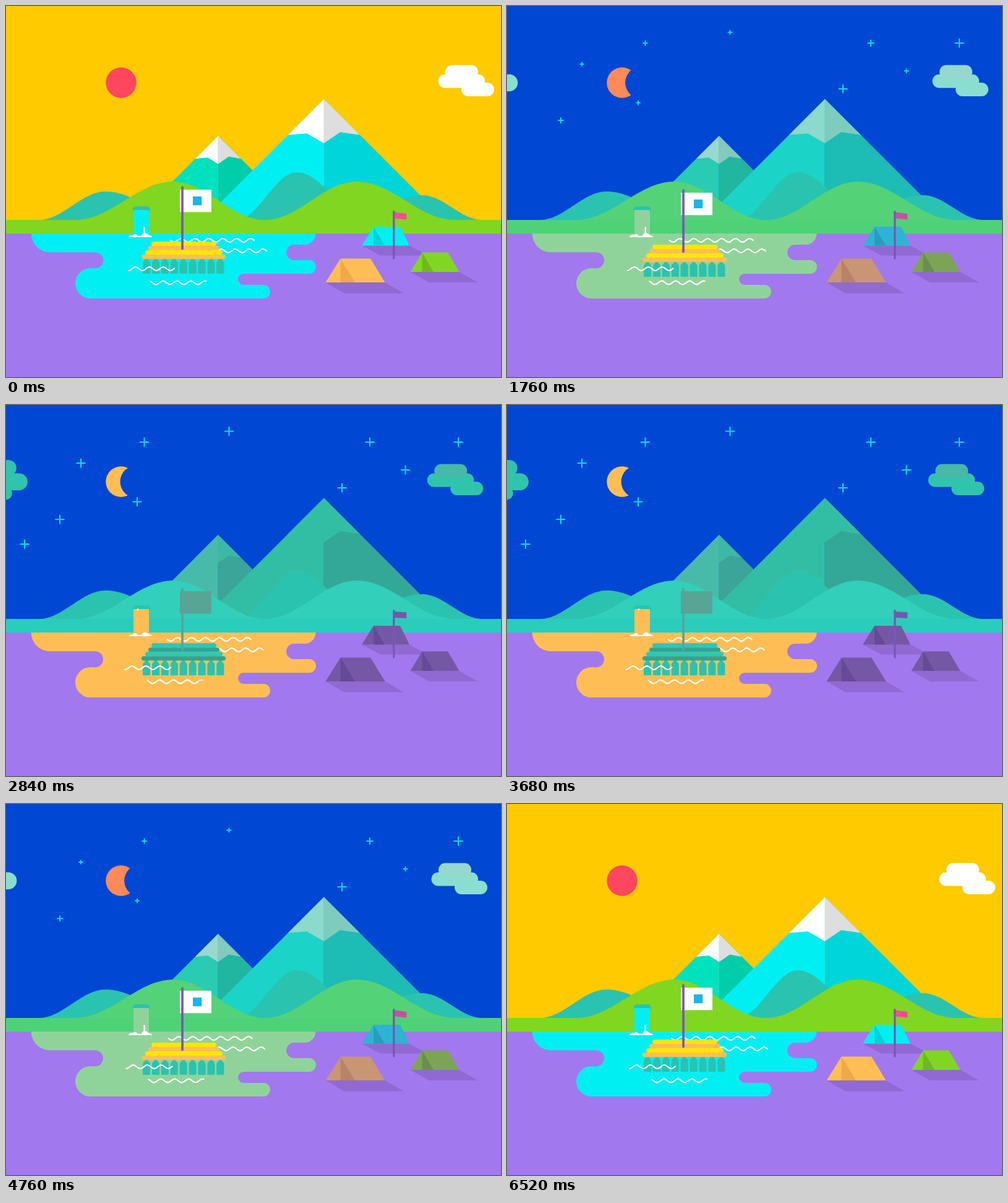
These frames come from a looping animation (800x600 px, 6560 ms). An HTML page with a canvas:

```html
<!DOCTYPE html>
<html lang="en">
<head>
<meta charset="utf-8">
<title>Lake camp, day and night</title>
<style>
html, body { margin: 0; width: 100%; height: 100%; overflow: hidden; }
canvas { display: block; width: 800px; height: 600px; }
</style>
</head>
<body>
<canvas id="stage" width="800" height="600"></canvas>
<script>
const ctx = document.getElementById('stage').getContext('2d');
const LOOP = 6560, STEP = 40, TEAL = '#2ac3af', GROUND = '#a278ee';

const clamp = v => Math.max(0, Math.min(1, v));
const ramp = (u, from, to) => clamp((u - from) / (to - from));
const lerp = (a, b, p) => a + (b - a) * p;

function mix(a, b, p) {
  const part = (hex, i) => parseInt(hex.slice(i, i + 2), 16);
  return `rgb(${[1, 3, 5].map(i => Math.round(lerp(part(a, i), part(b, i), p)))})`;
}

function poly(color, ...pts) {
  ctx.fillStyle = color;
  ctx.beginPath();
  for (let i = 0; i < pts.length; i += 2) ctx.lineTo(pts[i], pts[i + 1]);
  ctx.fill();
}

function rect(color, x, y, w, h) {
  ctx.fillStyle = color;
  ctx.fillRect(x, y, w, h);
}

function pill(color, x, y, w, h, r = h / 2) {
  ctx.fillStyle = color;
  ctx.beginPath();
  ctx.roundRect(x, y, w, h, r);
  ctx.fill();
}

function disc(color, x, y, r) {
  ctx.fillStyle = color;
  ctx.beginPath();
  ctx.arc(x, y, r, 0, Math.PI * 2);
  ctx.fill();
}

// Cosine hump standing on y = 346, with its own reach on each side
function hill(color, cx, top, left, right) {
  ctx.fillStyle = color;
  ctx.beginPath();
  for (let x = cx - left; x <= cx + right; x += 2) {
    const d = (x - cx) / (x < cx ? left : right);
    ctx.lineTo(x, top + (346 - top) * (1 - Math.cos(Math.PI * d)) / 2);
  }
  ctx.lineTo(cx + right, 347);
  ctx.lineTo(cx - left, 347);
  ctx.fill();
}

function drawSky(u, land) {
  const sky = mix('#ffca00', '#0047d3', ramp(u, 1360, 1760));
  rect(sky, 0, 0, 800, 368);
  disc(mix('#ff465f', '#ffbe55', land), 186, 124, 24.7);
  if (u > 1360) {
    const k = 1 - (1 - ramp(u, 1360, 2160)) ** 2;
    disc(sky, lerp(237, 210.5, k), 124, 26);
  }
  drawStars(u);
}

function drawStars(u) {
  const stars = [
    [731, 60, 1360], [543, 134, 1375], [588, 60, 1480], [645.5, 105, 1580], [360.5, 42.5, 1580],
    [223.5, 60, 1560], [212, 156.5, 1590], [87, 185, 1530], [121, 94, 1600], [30, 225, 1770]
  ];
  ctx.strokeStyle = '#00e1eb';
  ctx.lineWidth = 2;
  ctx.lineCap = 'round';
  for (const [x, y, start] of stars) {
    const r = 6.8 * ramp(u, start, start + 400);
    if (!r) continue;
    ctx.beginPath();
    ctx.moveTo(x - r, y);
    ctx.lineTo(x + r, y);
    ctx.moveTo(x, y - r);
    ctx.lineTo(x, y + r);
    ctx.stroke();
  }
}

function drawClouds(u, land) {
  const body = mix('#ffffff', '#30c4ac', land);
  const cap = mix('#ffffff', '#46b9a8', land);
  const x = -u / 160;
  pill(body, 698.5 + x, 110.5, 75.5, 22);
  pill(body, 736 + x, 124, 53, 22);
  pill(cap, 710 + x, 95.5, 53, 22);
  const edge = -11 + u / 62;
  pill(body, edge - 98, 89, 80, 26);
  pill(body, edge - 110, 110.5, 110, 27.5);
  pill(body, edge - 95, 132, 70, 21.5);
}

// Two shaded faces and a snow cap; dip points give the snow's lower rim
function mountain(x, y, snow, l, r, tip, colors) {
  const base = 346, h = base - y;
  poly(colors[0], x, y, x - h, base, x, base);
  poly(colors[1], x, y, x + h, base, x, base);
  poly(colors[2], x, y, x - snow, y + snow, l[0], l[1], x, tip);
  poly(colors[3], x, y, x + snow, y + snow, r[0], r[1], x, tip);
}

function drawLand(land) {
  mountain(342.8, 210, 37, [326, 245], [360, 243.5], 255.5, [
    mix('#00e1be', '#48baaa', land), mix('#00cdaa', '#3aa598', land),
    mix('#ffffff', '#48baaa', land), mix('#dedede', '#3cb9a5', land)
  ]);
  mountain(513.8, 150.5, 58, [486, 206], [540, 204], 222, [
    mix('#00eff3', '#32bea5', land), mix('#00d5d9', '#34a898', land),
    mix('#ffffff', '#32bea5', land), mix('#dedede', '#32bea5', land)
  ]);
  hill(TEAL, 470, 269, 98, 118);
  hill(TEAL, 161, 300, 108, 135);
  hill(TEAL, 672, 306, 125, 98);
  const green = mix('#80d621', '#32cfbb', land);
  hill(green, 270, 284, 158, 148);
  hill(green, 567, 284, 148, 158);
  rect(mix('#80d621', '#2acdbb', land), 0, 346, 800, 22.5);
  rect(GROUND, 0, 368, 800, 232);
}

function drawLake(color) {
  const Q = Math.PI / 2;
  ctx.fillStyle = color;
  ctx.beginPath();
  ctx.moveTo(500.5, 368);
  ctx.arc(482.5, 368, 18, 0, Q);
  ctx.arc(465.5, 398.5, 12.5, -Q, Q, true);
  ctx.arc(490, 422, 11, -Q, Q);
  ctx.arc(384, 442, 9, -Q, Q, true);
  ctx.arc(416, 462, 11, -Q, Q);
  ctx.arc(136.5, 448.5, 24.5, Q, 3 * Q);
  ctx.arc(144, 411.2, 13, Q, -Q, true);
  ctx.arc(71, 368, 30.3, Q, 2 * Q);
  ctx.fill();
}

function drawFall(u, water) {
  pill(TEAL, 205, 324, 27.5, 9, [5, 5, 2, 2]);
  rect(water, 206, 330, 25, 39);
  ctx.save();
  ctx.beginPath();
  ctx.rect(200, 329.5, 36, 43);
  ctx.clip();
  for (const [x, start] of [[213, 176], [223.7, 536]]) {
    const head = 329 + ((u - start) % 880 + 880) % 880 / 8;
    pill('#ffffff', x - 1.2, head - 15, 2.4, 15);
  }
  ctx.restore();

  const swell = Math.cos(u / 880 * Math.PI * 2);
  ctx.save();
  ctx.beginPath();
  ctx.rect(190, 355, 55, 18.5);
  ctx.clip();
  disc('#ffffff', 203, 373.5, 2.5 + swell);
  disc('#ffffff', 208.5, 373, 4);
  disc('#ffffff', 224.5, 372.5, 5 + swell * 0.6);
  disc('#ffffff', 230, 373.5, 3.5);
  ctx.restore();
  pill('#ffffff', 198, 371.7, 38, 2);
}

function wave(x, y, len, phase) {
  ctx.strokeStyle = '#ffffff';
  ctx.lineWidth = 2.2;
  ctx.lineCap = 'round';
  ctx.beginPath();
  for (let d = 0; d <= len; d += 1) {
    ctx.lineTo(x + d, y + 2.8 * Math.sin(d / 22.5 * Math.PI * 2 + phase));
  }
  ctx.stroke();
}

function drawRaft(u) {
  const night = ramp(u, 1760, 2400);
  const yellow = mix('#ffe600', '#2dc8b4', night);
  const orange = mix('#ffbe55', '#30a594', night);
  const cloth = mix('#ffffff', '#58a596', night);
  ctx.save();
  ctx.translate(0, 2.5 * (1 - Math.cos(u / 1200 * Math.PI * 2)));
  for (let i = 0; i < 9; i++) {
    const x = 221 + i * 14.9;
    rect(TEAL, x + 3.2, 408, 5.8, 4);
    pill(TEAL, x, 411, 12.2, 22, [5, 5, 1, 1]);
  }
  pill(yellow, 235, 381, 105, 7.2);
  pill(orange, 230, 388, 115, 7.2);
  pill(yellow, 225, 395, 125, 7.2);
  pill(orange, 219, 402, 136, 7.2);
  rect(cloth, 281, 297, 51, 36.3);
  rect(mix('#19b5e8', '#58a596', night), 302, 308, 14.2, 14.2);
  pill(mix('#7858b4', '#58a596', night), 283.2, 291.3, 3.7, 103);
  ctx.restore();
}

// x0..x3: foot left, ridge left, ridge right, foot right
function tent(x0, x1, x2, x3, top, foot, fold, lean, color, dark) {
  poly('#9169d2', x0, foot, x3, foot, x3 + 30, foot + lean, x0 + 30, foot + lean);
  poly(color, x0, foot, x1, top, x2, top, x3, foot);
  poly(dark, x1, top, x1, foot, fold, foot);
}

function drawCamp(u) {
  const night = ramp(u, 1400, 2300);
  const shade = day => mix(day, '#7558a5', night);
  const deep = day => mix(day, '#654a98', night);
  tent(575, 594, 637, 652, 357, 387.5, 612, 16, shade('#00eff3'), deep('#00d2d7'));
  tent(516.5, 540.5, 589, 612.5, 408.5, 447, 564, 17.5, shade('#ffbe55'), deep('#eeaa46'));
  tent(653.5, 672.5, 714, 732.5, 398.5, 430, 691, 17, shade('#80d621'), deep('#6eb91e'));
  const flap = Math.cos(u / 880 * Math.PI * 2);
  poly(mix('#ff4b91', '#7558aa', night),
    628, 334 - flap * 0.6, 647.3, 335 + flap, 647.3, 345 + flap * 0.6, 628, 344 - flap * 0.6);
  pill('#7558b4', 625.2, 331, 3.2, 78.5);
}

function draw(time) {
  // The scene runs to night and back along the same path
  const t = Math.floor(time % LOOP / STEP) * STEP;
  const u = Math.min(t, LOOP - STEP - t);
  const land = ramp(u, 1240, 2160);
  const water = mix('#00eff3', '#ffbe55', land);
  const drift = -u * 0.00195;

  drawSky(u, land);
  drawClouds(u, land);
  drawLand(land);
  drawLake(water);
  drawFall(u, water);
  wave(266 + drift, 379, 135, 0);
  wave(331 + drift, 396, 90, 0);
  drawRaft(u);
  wave(198 + drift, 425, 74, Math.PI / 2);
  wave(234 + drift, 447.5, 89, -Math.PI / 4);
  drawCamp(u);
}

const began = performance.now();
function frame() {
  draw(performance.now() - began);
  requestAnimationFrame(frame);
}
frame();
</script>
</body>
</html>
```
